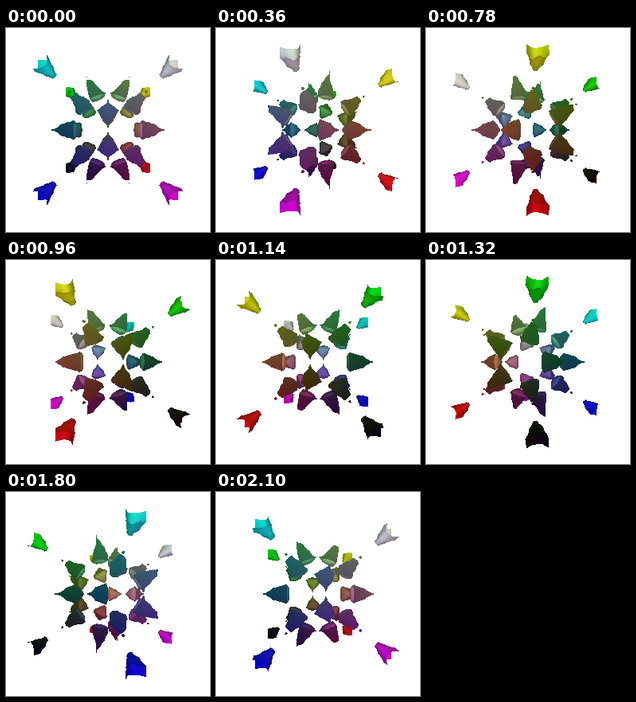
Write an HTML page with a canvas that moves like this. It is 256x256 px and loops after 2.16 s.

```html
<!DOCTYPE html>
<html lang="en">
<head>
<meta charset="utf-8">
<title>Rotating sextic surface</title>
<style>
  html, body { margin: 0; width: 100%; height: 100%; overflow: hidden; background: #fff; }
  canvas { display: block; width: 100vw; height: 100vh; image-rendering: pixelated; }
</style>
</head>
<body>
<canvas id="stage" width="256" height="256"></canvas>
<script>
const SIZE = 256, POSES = 36, POSE_MS = 60;
const BOX = 1.5;                // half edge of the clipping cube
const CELLS = 20, NODES = CELLS + 1, CELL = 2 * BOX / CELLS;
const EYE = 5;                  // camera distance
const FOCAL = SIZE / 2 / Math.tan(Math.PI / 6);
const STEP = 0.04;
const PHI2 = (3 + Math.sqrt(5)) / 2;
const PHI3 = 2 + Math.sqrt(5);

const ctx = document.getElementById('stage').getContext('2d');
const cache = [];

// Barth sextic: six planes of icosahedral symmetry against a double sphere
function sextic(x, y, z) {
  const xx = x * x, yy = y * y, zz = z * z, s = xx + yy + zz - 1;
  return 4 * (PHI2 * xx - yy) * (PHI2 * yy - zz) * (PHI2 * zz - xx) - PHI3 * s * s;
}

// The surface is sampled on a coarse grid, which gives its facets and gaps
const grid = new Float64Array(NODES ** 3);
const coord = i => i * CELL - BOX;
for (let i = 0, n = 0; i < NODES; i++)
  for (let j = 0; j < NODES; j++)
    for (let k = 0; k < NODES; k++) grid[n++] = sextic(coord(i), coord(j), coord(k));

const cellOf = g => Math.max(0, Math.min(CELLS - 1, Math.floor(g)));

// Trilinear value of the sampled surface
function field(x, y, z) {
  const gx = (x + BOX) / CELL, gy = (y + BOX) / CELL, gz = (z + BOX) / CELL;
  const i = cellOf(gx), j = cellOf(gy), k = cellOf(gz);
  const fx = gx - i, fy = gy - j, fz = gz - k;
  const n = (i * NODES + j) * NODES + k;
  const edge = m => grid[m] + (grid[m + 1] - grid[m]) * fz;
  const side = m => {
    const a = edge(m);
    return a + (edge(m + NODES) - a) * fy;
  };
  const a = side(n);
  return a + (side(n + NODES * NODES) - a) * fx;
}

// Where the ray is inside the cube, as [near, far]
function clipToBox(o, d) {
  let near = 0, far = Infinity;
  for (let k = 0; k < 3; k++) {
    const inv = 1 / (d[k] || 1e-12);
    const a = (-BOX - o[k]) * inv, b = (BOX - o[k]) * inv;
    near = Math.max(near, Math.min(a, b));
    far = Math.min(far, Math.max(a, b));
  }
  return [near, far];
}

// Distance to the first sign change along the ray, or -1
function findHit(o, d) {
  const [near, far] = clipToBox(o, d);
  if (near >= far) return -1;
  const [ox, oy, oz] = o, [dx, dy, dz] = d;
  const at = t => field(ox + dx * t, oy + dy * t, oz + dz * t);
  const positive = at(near) > 0;
  for (let t = near; t < far;) {
    const next = Math.min(t + STEP, far);
    if (at(next) > 0 !== positive) {
      let a = t, b = next;
      for (let i = 0; i < 10; i++) {
        const m = (a + b) / 2;
        if (at(m) > 0 === positive) a = m; else b = m;
      }
      return b;
    }
    t = next;
  }
  return -1;
}

// Flat base light; walls turned to the centre also catch the camera light
function shade([x, y, z], d) {
  const e = CELL / 2;
  const gx = field(x + e, y, z) - field(x - e, y, z);
  const gy = field(x, y + e, z) - field(x, y - e, z);
  const gz = field(x, y, z + e) - field(x, y, z - e);
  const inward = gx * x + gy * y + gz * z > 0;
  const facing = (gx * d[0] + gy * d[1] + gz * d[2]) / (Math.hypot(gx, gy, gz) || 1);
  return 0.5 + (inward ? 0.38 * facing * facing : 0);
}

function render(pose) {
  const angle = pose / POSES * 2 * Math.PI;
  const c = Math.cos(angle), s = Math.sin(angle);
  const image = ctx.createImageData(SIZE, SIZE);
  const pixels = image.data.fill(255);
  const origin = [EYE * s, 0, EYE * c];
  for (let row = 0; row < SIZE; row++) {
    for (let col = 0; col < SIZE; col++) {
      const u = col + 0.5 - SIZE / 2, v = SIZE / 2 - row - 0.5;
      const len = Math.hypot(u, v, FOCAL);
      const dir = [(u * c - FOCAL * s) / len, v / len, (-u * s - FOCAL * c) / len];
      const t = findHit(origin, dir);
      if (t < 0) continue;
      const point = origin.map((o, k) => o + dir[k] * t);
      const light = shade(point, dir);
      const index = (row * SIZE + col) * 4;
      // position in the cube gives red, green and blue
      for (let k = 0; k < 3; k++) {
        pixels[index + k] = 255 * light * (point[k] + BOX) / (2 * BOX);
      }
    }
  }
  return image;
}

const start = performance.now();
let shown = -1;

function draw() {
  const pose = Math.floor((performance.now() - start) / POSE_MS) % POSES;
  if (pose !== shown) {
    cache[pose] = cache[pose] || render(pose);
    ctx.putImageData(cache[pose], 0, 0);
    shown = pose;
  }
  requestAnimationFrame(draw);
}
draw();
</script>
</body>
</html>
```
